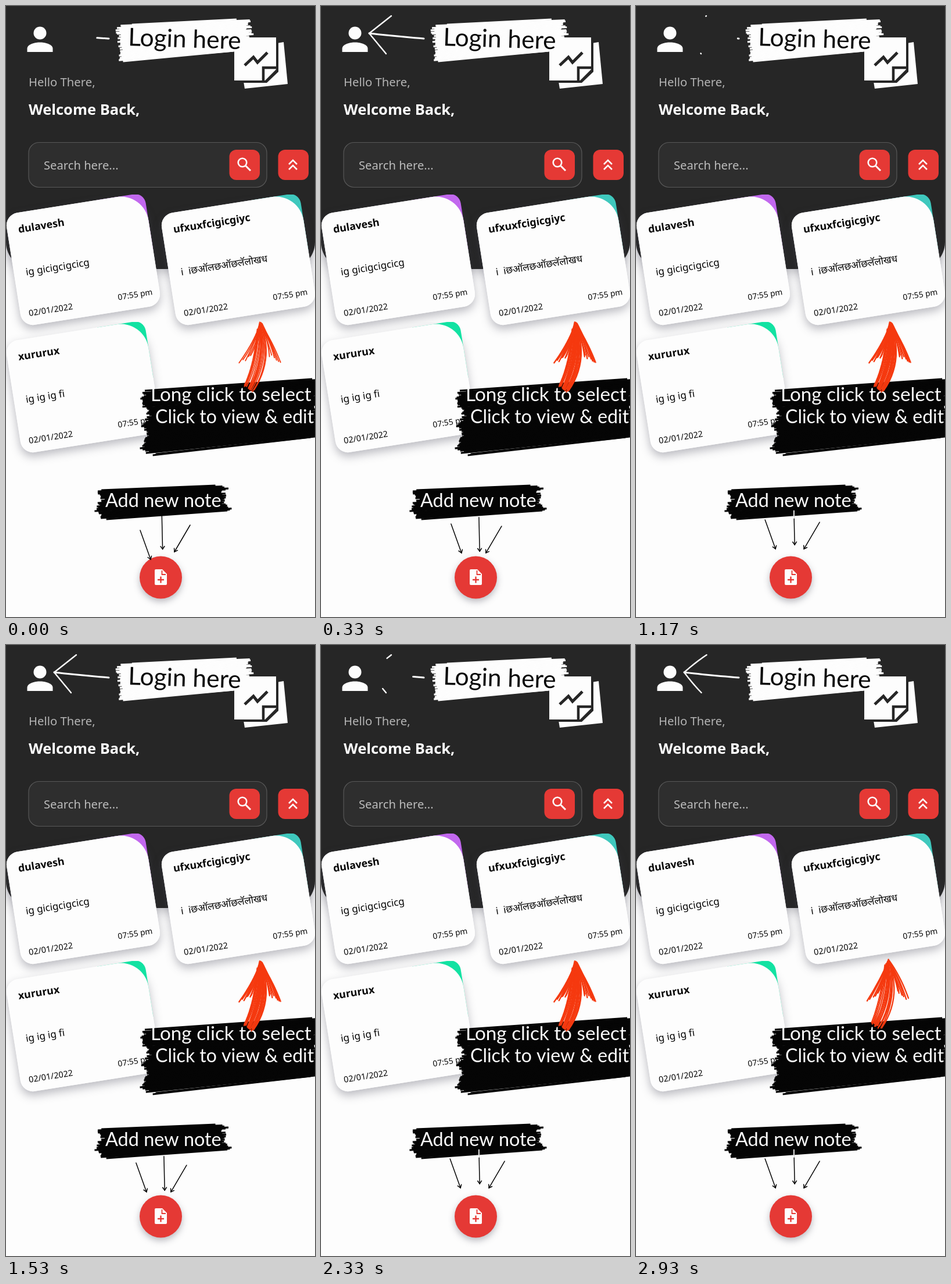
Recreate the animation shown at these times as an HTML page with a canvas. Size 532x1050 px, loop 2.96 s.

```html
<!DOCTYPE html>
<html lang="en">
<head>
<meta charset="utf-8">
<title>Notes app tour</title>
<style>
html, body { margin: 0; width: 100%; height: 100%; overflow: hidden; background: #fdfdfd; }
canvas { display: block; width: 532px; height: 1050px; }
</style>
</head>
<body>
<canvas id="stage" width="532" height="1050"></canvas>
<script>
const W = 532, H = 1050, LOOP = 2960;
const DARK = '#262626', PAPER = '#fdfdfd', RED = '#e53935', SCRIBBLE = '#f5390f', INK = '#050505';
const UI = '"Noto Sans", "Noto Sans Devanagari", "Open Sans", sans-serif';
const HAND = 'Lato, "Open Sans", sans-serif';

const view = document.getElementById('stage').getContext('2d');
const backdrop = document.createElement('canvas');
backdrop.width = W;
backdrop.height = H;
let g = backdrop.getContext('2d');

const clamp = v => Math.max(0, Math.min(1, v));

function seeded(seed) {
  return () => {
    seed = (seed * 16807) % 2147483647;
    return seed / 2147483647;
  };
}

function text(str, x, y, size, color, weight = 400, font = UI, align = 'left') {
  g.font = `${weight} ${size}px ${font}`;
  g.fillStyle = color;
  g.textAlign = align;
  g.fillText(str, x, y);
}

function box(x, y, w, h, r, color) {
  g.beginPath();
  g.roundRect(x, y, w, h, r);
  g.fillStyle = color;
  g.fill();
}

function disc(x, y, r, color) {
  box(x - r, y - r, 2 * r, 2 * r, r, color);
}

function line(points, color, width) {
  g.beginPath();
  points.forEach(p => g.lineTo(...p));
  g.strokeStyle = color;
  g.lineWidth = width;
  g.stroke();
}

function shape(path, color) {
  g.fillStyle = color;
  g.fill(new Path2D(path));
}

function raised(blur, dy, draw) {
  g.save();
  g.shadowColor = 'rgba(70,70,85,.36)';
  g.shadowBlur = blur;
  g.shadowOffsetY = dy;
  draw();
  g.restore();
}

// Dry paint stroke made of bristles, from a left edge (top y0, height h0) to a right one
function brush(x0, y0, h0, x1, y1, h1, color, seed) {
  const rnd = seeded(seed), rows = Math.round(h0 / 2);
  let left = 0, right = 0;
  for (let i = 0; i <= rows; i++) {
    const k = i / rows;
    const frayed = Math.abs(2 * k - 1) > .95 ? 30 : 7;
    left = left * .75 + (rnd() - .5) * 7;
    right = right * .75 + (rnd() - .5) * 9;
    line([
      [x0 + left + rnd() * frayed, y0 + h0 * k],
      [x1 + right - rnd() * frayed, y1 + h1 * k]
    ], color, 3.2);
  }
}

function header() {
  raised(20, 4, () => box(0, -60, W, 512, 46, DARK));

  disc(58.5, 46.5, 11, PAPER);
  shape('M36.5 79V73C37 65 51 62.5 58.5 62.5S80 65 80.5 73V79Z', PAPER);

  text('Hello There,', 39, 138, 20.3, '#b4b4b4');
  text('Welcome Back,', 39, 187, 25.5, PAPER, 600);

  box(39, 234.5, 410, 77, 18, '#2e2e2e');
  g.strokeStyle = '#585858';
  g.lineWidth = 1.2;
  g.stroke();
  text('Search here...', 65, 281, 20.2, '#bcbcbc');

  for (const x of [384.5, 468.5]) box(x, 247, 52.5, 52, 12, RED);
  disc(407, 269, 8.6, PAPER);
  disc(407, 269, 6, RED);
  line([[412, 274], [421, 283]], PAPER, 3);
  for (const y of [272, 281]) line([[487, y], [494, y - 7], [501, y]], PAPER, 2.6);
}

function loginLabel() {
  brush(191, 32, 63, 422, 23, 54, PAPER, 41);

  shape('M460 65L478 62L485 134L411 142L408 124Z', PAPER);
  shape('M465 54H469V113L449 132H407V126Z', DARK);
  shape('M393 54H465V109L446 128H393Z', PAPER);
  line([[411, 102], [426, 88], [433, 97], [450, 80]], DARK, 5);
  line([[443, 128], [443, 106], [465, 106]], DARK, 4.5);

  g.save();
  g.translate(210, 68);
  g.rotate(.032);
  text('Login here', 0, 0, 42.5, INK, 400, HAND);
  g.restore();
}

function card(dx, dy, tint, title, body) {
  const face = () => box(-121.5, -97.5, 243, 195, [22, 48, 22, 22], PAPER);
  g.save();
  g.beginPath();
  g.rect(0, 324 + dy, W, 300);
  g.clip();
  g.translate(133 + dx, 436 + dy);
  g.rotate(-Math.PI / 20);
  raised(16, 7, face);
  box(40, -97.5, 81.5, 100, [0, 18, 0, 0], tint);
  face();
  text(title, -102.5, -62.8, 17.8, INK, 600);
  text(body, -101, 11.4, 16.9, INK);
  text('02/01/2022', -107, 81.3, 14.4, INK);
  text('07:55 pm', 109, 78, 13.8, INK, 400, UI, 'right');
  g.restore();
}

function lowerLabels() {
  brush(237, 661, 111, 540, 641, 100, INK, 77);
  text('Long click to select', 249, 679, 33.3, PAPER, 400, HAND);
  text('Click to view & edit', 257, 717, 32, PAPER, 400, HAND);

  brush(157, 832, 50, 382, 824, 43, INK, 19);
  text('Add new note', 171, 861, 32.4, PAPER, 400, HAND);
}

function addButton() {
  raised(12, 5, () => disc(266.5, 982, 36.5, RED));
  shape('M258 968H269L277 976V993Q277 995 275 995H258Q256 995 256 993V970Q256 968 258 968Z', PAPER);
  line([[268.5, 970], [268.5, 977], [275, 977]], RED, 1.8);
  line([[261, 986], [272, 986]], RED, 2.4);
  line([[266.5, 980.5], [266.5, 991.5]], RED, 2.4);
}

function paintBackdrop() {
  g.fillStyle = PAPER;
  g.fillRect(0, 0, W, H);
  header();
  loginLabel();
  card(0, 0, '#c268ee', 'dulavesh', 'ig gicigcigcicg');
  card(267, 0, '#3fc8bd', 'ufxuxfcigicgiyc', 'i  iछऑलछऑछलॅलोखध');
  card(0, 219, '#12e2a2', 'xururux', 'ig ig ig fi');
  lowerLabels();
  addButton();
}

// Part of a quadratic curve between the fractions from and to
function arc(a, c, b, from, to, color, width) {
  if (to <= from) return;
  const points = [];
  for (let i = 0; i <= 12; i++) {
    const t = from + (to - from) * i / 12, u = 1 - t;
    points.push([0, 1].map(k => u * u * a[k] + 2 * u * t * c[k] + t * t * b[k]));
  }
  line(points, color, width);
}

// Drawn from tail to head, held with a slight wobble, then wiped from the head outwards
function loginArrow(t) {
  const phase = t % 1200;
  const bend = 3 - 3 * Math.cos(Math.PI * Math.floor((phase - 270) / 133) / 3);
  const tip = [83, 47];
  const gone = clamp((phase - 950) / 225);
  const shaft = clamp(.21 + phase / 200);
  const head = clamp((phase - 160) / 120);
  arc(tip, [130, 52 + bend / 4], [177, 56], Math.max(gone, 1 - shaft), 1, PAPER, 3);
  arc(tip, [102 - bend * .4, 32 - bend], [121 + bend * .4, 17], gone, head, PAPER, 2.4);
  arc(tip, [97 - bend * .3, 64 + bend], [112 + bend * .4, 82], gone, head, PAPER, 2.4);
}

// Hatched arrow: mostly held, re-sketched with fewer strokes around each second
function scribble(t) {
  const phase = t % 1000;
  const late = phase > 800, early = phase < 130;
  const strokes = early || late ? 12 : 16;
  const width = early ? 1.8 : 2.3;
  const rnd = seeded(late ? 408 : 311);
  const near = (x, y) => [x + (rnd() - .5) * 3, y + (rnd() - .5) * 6];
  g.save();
  if (late) g.translate(-4, -4);
  for (let i = 0; i < strokes; i++) {
    const k = i / (strokes - 1);
    arc(near(434 + 8 * k, 553), near(427 + 32 * k, 612), near(410 + 16 * k, 654 + 8 * k), 0, 1, SCRIBBLE, width);
    if (i % 2) continue;
    arc(near(438, 546), near(428 + 8 * k, 576), near(402 + 26 * k, 613 - 15 * k), 0, 1, SCRIBBLE, width);
    arc(near(440, 547), near(458 - 9 * k, 574), near(472 - 20 * k, 613 - 14 * k), 0, 1, SCRIBBLE, width);
  }
  g.restore();
}

function pointer(x, y, dx, dy) {
  const ex = x + dx, ey = y + dy, a = Math.atan2(dy, dx);
  const barb = s => [ex - 6 * Math.cos(a + s), ey - 6 * Math.sin(a + s)];
  line([[x, y], [ex, ey]], INK, 1.5);
  line([barb(.6), [ex, ey], barb(-.6)], INK, 1.5);
  if (y < 872) line([[x, y], [x, 880]], PAPER, 1.8);
}

// Three arrows that sway round in three held steps
function pointers(t) {
  const a = Math.floor(t % 600 / 200) * Math.PI * 2 / 3;
  const c = Math.cos(a), s = Math.sin(a);
  pointer(225.7 + 5.3 * c + s, 891.3 + 9.7 * c + 4 * s, 18, 50);
  pointer(270.7 - 2.4 * c, 873.7 + 1.3 * c + 6.5 * s, 1.3, 58.5);
  pointer(314.7 + 2.3 * c - 3 * s, 891 + c + 4 * s, -27, 46);
}

paintBackdrop();
g = view;
g.lineCap = 'round';

function frame() {
  const t = performance.now() % LOOP;
  g.drawImage(backdrop, 0, 0);
  loginArrow(t);
  scribble(t);
  pointers(t);
  requestAnimationFrame(frame);
}
frame();
</script>
</body>
</html>
```
